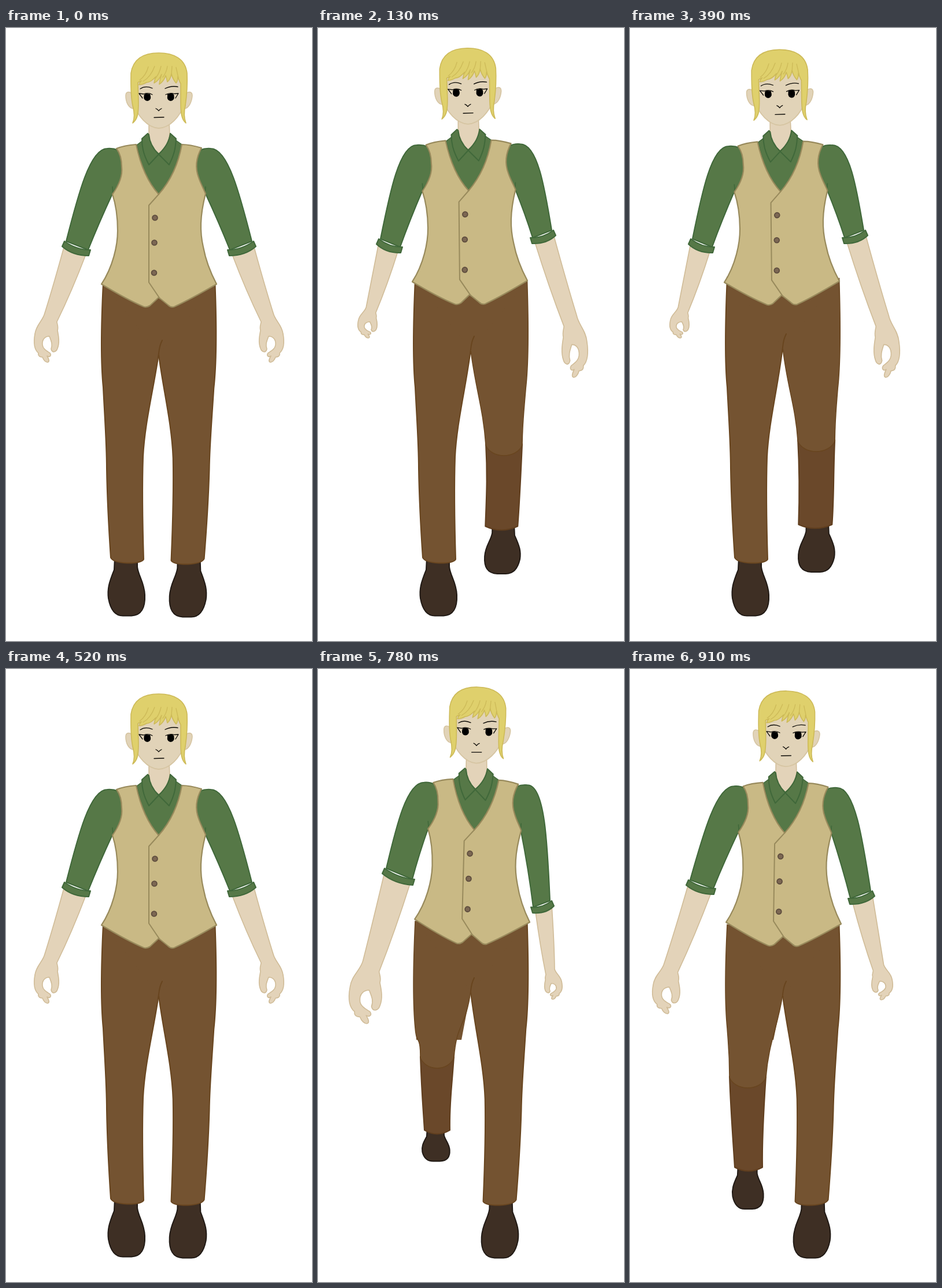
These frames come from a looping animation (529x1058 px, 1040 ms). An HTML page with a canvas:

```html
<!DOCTYPE html>
<html lang="en">
<head>
<meta charset="utf-8">
<title>Walk cycle</title>
<style>
  html, body { margin: 0; width: 100%; height: 100%; overflow: hidden; background: #fff; }
  canvas { display: block; }
</style>
</head>
<body>
<canvas id="stage" width="529" height="1058"></canvas>
<script>
const ctx = document.getElementById('stage').getContext('2d');
const W = 529, H = 1058, STEP = 130;

const SKIN = ['#e3d3b9', '#d0bc98'];
const FACE = ['#e1d3b8', '#d6c5a2'];
const HAIR = ['#dfd06c', '#cdba58'];
const GREEN = ['#567847', '#40683a'];
const VEST = ['#c9b985', '#988a5c'];
const PANTS = ['#745331', '#68451f'];
const SHIN = ['#6a482a', '#603e1e'];
const SHOE = ['#3e2f24', '#211a15'];

const svg = d => new Path2D(d);

function paint(path, [fill, line], width = 2) {
  ctx.fillStyle = fill;
  ctx.fill(path);
  ctx.strokeStyle = line;
  ctx.lineWidth = width;
  ctx.stroke(path);
}

function stroke(path, color, width) {
  ctx.strokeStyle = color;
  ctx.lineWidth = width;
  ctx.stroke(path);
}

// Fixed shapes, drawn in the resting position
const neck = svg('M247 158 L247 184 L250 204 L264 219 L280 203 L283 184 L282 158 Z');
const shirt = svg('M226 202 L238 193 L250 204 L264 217 L280 203 L291 192 L304 201 L295 245 L264 290 L238 250 Z');
const collar = svg(`M245 182 L235 191 C235 205 237 217 247 236 L264 218 C253 207 248 197 247 184 Z
  M284 182 L294 191 C293 208 291 218 282 236 L264 218 C276 206 282 196 284 182 Z`);
const vest = svg(`M191 208 C201 204 212 202 225 201 C232 235 244 265 264 287
  C286 262 298 235 304 201 C316 201 328 204 338 207 C328 225 327 242 333 258
  C337 270 342 278 345 286 C335 325 335 352 341 378 C346 405 355 425 364 442
  C340 456 315 470 291 481 Q285 483 280 478 L264 465 L249 479 Q243 483 238 481
  C212 470 188 456 165 442 C185 412 193 375 193 350 C193 322 190 305 184 287
  C194 273 202 256 200 240 C200 226 197 216 191 208 Z`);
const placket = svg('M264 287 L247 306 L247 439 L266 467');
const buttons = [[257.5, 327.5], [256.5, 370.5], [256, 422.5]];

const ears = svg(`M218 113 C212 109 207 110 207 117 C207 128 212 138 220 139 Z
  M311 113 C317 109 322 110 322 117 C321 128 316 138 309 139 Z`);
const face = svg('M217 85 C217 105 218 120 221 133 C228 151 244 172 264 173 C284 172 300 153 308 133 C311 118 312 100 312 85 C300 50 230 50 217 85 Z');
const hair = svg(`M219 164 C223 155 222 145 219 134 C215 115 216 95 216 78
  C220 52 240 43 264 43 C290 43 310 53 313 78 C314 100 312 120 310 134
  C307 147 308 156 311 164 C303 158 302 145 302 128 L302 96
  Q300 93 297 84 Q297 92 294 95 Q288 88 286 79 Q284 89 279 93
  Q278 87 276 82 Q273 92 265 97 Q266 88 269 80 Q264 91 256 95
  Q257 89 259 84 Q250 94 243 94 Q236 98 230 98 Q231 94 234 91
  L228 94 L229 128 C229 147 228 157 219 164 Z`);
const strands = svg(`M246 67 C243 78 238 85 231 90 M257 66 C253 77 246 87 237 92
  M268 66 C266 75 263 81 259 86 M279 66 C278 73 275 80 271 85 M287 66 L286 80 M294 68 L298 86`);
const irises = svg('M250 118 A6 6.2 0 1 1 238.500 118 Q238 114 242 113 L249 114 Z M279 118 A6 6.200 0 1 0 290.500 118 Q291 114 287 112.500 L279 114 Z');
const features = svg(`M232 105 C238 101 246 101 253 104 M275 104.500 C282 101 290 100 297 101.500
  M230 113 L238 114 Q246 111 253 115 M230 113 L236 121
  M276 115 Q283 111 291 113.500 L298 113 M298 113 L293 121
  M259 139 Q262 140 264 143 Q266 140 269 139 M256 154.500 L273 154`);

const shoe = svg(`M188 914 L187 935 C178 957 175 968 177 984 C181 1006 190 1014 202 1014
  L217 1014 C235 1013 241 1000 240 978 C239 956 229 946 227 930 L227 914 Z`);

// Cubic segments after the first point, from outer wrist to inner wrist
const hand = [
  67, 492, 64, 505, 52, 512, 50, 528, 47, 545, 50, 556, 56, 561,
  55, 567, 60, 568, 63, 568, 65, 574, 69, 577, 72, 577,
  76, 576, 74, 571, 71, 566, 76, 569, 79, 565, 76, 561,
  70, 557, 64, 554, 63, 547, 62, 537, 68, 532, 75, 532,
  78, 540, 81, 546, 78, 554, 80, 562, 87, 559, 89, 553,
  93, 543, 91, 532, 89, 522, 91, 515, 88, 510, 88, 507
];

// Arms: outer cuff x y, inner cuff x y, then the hand's left, right, top, bottom
const ARM = {
  rest: [97, 377, 143, 393, 49, 92, 492, 577],
  back: [101, 373, 143, 388, 69, 103, 482, 535],
  back2: [106, 392, 149, 406, 75, 112, 510, 571],
  farBack: [121, 409, 158, 421, 107, 138, 518, 570],
  front: [118, 358, 159, 372, 63, 108, 496, 603],
  front2: [97, 373, 145, 389, 39, 87, 508, 595],
  farFront: [111, 353, 164, 373, 54, 111, 503, 612]
};

// body: shift x, shift y, lean in degrees, stretch
// leg: knee left, right, y; hem left, right, y; shoe left, right, y
const rest = { body: [0, 0, 0, 1], crotch: 562, arms: [ARM.rest, ARM.rest] };
const poses = [
  rest,
  { body: [-2, -5, -0.57, 1.008], crotch: 555, arms: [ARM.back, ARM.front],
    lifted: 1, leg: [173, 236, 736, 179, 235, 861, 174, 236, 940] },
  { body: [-2, -7.5, -1.5, 1.011], crotch: 555, arms: [ARM.farBack, ARM.farFront],
    lifted: 1, leg: [174, 236, 687, 181, 226, 798, 177, 225, 847] },
  { body: [-2, -4, -0.6, 1.004], crotch: 551, arms: [ARM.back, ARM.front],
    lifted: 1, leg: [172, 236, 729, 175, 233, 858, 170, 233, 937] },
  rest,
  { body: [1, -3.5, 0.63, 1.005], crotch: 560, arms: [ARM.front2, ARM.back2],
    lifted: 0, leg: [173, 234, 726, 181, 231, 871, 178, 231, 941] },
  { body: [2, -7.5, 1.5, 1.011], crotch: 556, arms: [ARM.farFront, ARM.farBack],
    lifted: 0, leg: [177, 235, 689, 184, 228, 799, 180, 228, 849.5] },
  { body: [1, -3.5, 0.86, 1.004], crotch: 562, arms: [ARM.front2, ARM.back2],
    lifted: 0, leg: [172, 235, 723, 181, 229, 863, 177, 231, 932] }
];

function bodyMatrix([x, y, lean, stretch]) {
  return new DOMMatrix().translate(264 + x, 445 + y).rotate(lean)
    .scale(1, stretch).translate(-264, -445);
}

function drawShoe(left, right, top, bottom) {
  const fit = new DOMMatrix().translate(left, bottom)
    .scale((right - left) / 64, (bottom - top) / 94).translate(-176.5, -1014);
  const path = new Path2D();
  path.addPath(shoe, fit);
  paint(path, SHOE);
}

function drawLeg(side, pose) {
  const { crotch, leg, lifted } = pose;
  const top = `M168 ${crotch - 121} C164 520 164 580 168 620`;
  ctx.save();
  if (side) ctx.transform(-1, 0, -0.0125, 1, 535, 2);
  if (leg && lifted === side) {
    const [kl, kr, ky, hl, hr, hy, sl, sr, sy] = leg;
    drawShoe(sl, sr, hy, sy);
    paint(svg(`M${kl} ${ky - 20} C${kl + 2} ${ky + 40} ${hl - 3} ${hy - 50} ${hl} ${hy - 3}
      Q${(hl + hr) / 2} ${hy + 10} ${hr} ${hy - 3} C${hr - 1} ${hy - 50} ${kr - 4} ${ky + 40} ${kr} ${ky - 20} Z`), SHIN);
    paint(svg(`${top} C170 650 ${kl} ${ky - 60} ${kl} ${ky - 18}
      C${kl + 10} ${ky + 6} ${kr - 10} ${ky + 6} ${kr} ${ky - 18}
      C${kr + 5} ${ky - 80} 255 620 264 ${crotch}`), PANTS, 1.5);
  } else {
    drawShoe(176.5, 240.5, 920, 1014.5);
    paint(svg(`${top} C171 680 174 720 174 760 C175 820 178 870 181 914
      Q184 922 209 923.500 Q234 924 238 917 C236 850 235 800 237 740
      C240 680 256 620 264 ${crotch}`), PANTS);
  }
  ctx.restore();
}

function drawLegs(pose) {
  const c = pose.crotch;
  ctx.fillStyle = PANTS[0];
  ctx.fill(svg(`M168 ${c - 121} L360 ${c - 121} L363 560 L350 640 L282 640 L264 ${c} L248 640 L170 640 L165 560 Z`));
  drawLeg(0, pose);
  drawLeg(1, pose);
  stroke(svg(`M270 ${c - 23} Q265 ${c - 13} 264 ${c}`), PANTS[1], 2);
}

function drawArm(side, arm, body) {
  const [ox, oy, ix, iy, left, right, top, bottom] = arm;
  const at = (x, y) => {
    const p = body.transformPoint(new DOMPoint(side ? W - x : x, y));
    return [side ? W - p.x : p.x, p.y];
  };
  const hx = x => left + (x - 49) / 43 * (right - left);
  const hy = y => top + (y - 492) / 85 * (bottom - top);

  ctx.save();
  if (side) ctx.transform(-1, 0, 0, 1, W, 0);

  const limb = new Path2D();
  const wx = hx(67), ex = hx(88), ey = hy(507);
  limb.moveTo(ox + 4, oy - 2);
  limb.quadraticCurveTo((ox + 4 + wx) / 2 - 2, (oy + top) / 2 + 10, wx, top);
  for (let i = 2; i < hand.length; i += 6) {
    const [a, b, c, d, e, f] = hand.slice(i, i + 6);
    limb.bezierCurveTo(hx(a), hy(b), hx(c), hy(d), hx(e), hy(f));
  }
  limb.quadraticCurveTo((ix - 5 + ex) / 2 + 1, (iy + ey) / 2 + 4, ex + (ix - 5 - ex), iy - 2);
  limb.closePath();
  paint(limb, SKIN, 1.6);

  const [sx, sy] = at(175, 208), [nx, ny] = at(194, 211);
  const [px, py] = at(185, 284), [qx, qy] = at(212, 245);
  const tx = ox + 7, ty = oy - 9, ux = ix - 1, uy = iy - 10;
  const sleeve = new Path2D();
  sleeve.moveTo(nx, ny);
  sleeve.quadraticCurveTo(sx + 10, sy - 1, sx, sy);
  sleeve.bezierCurveTo(sx - 30, sy, (sx + tx) / 2 - 15, (sy + ty) / 2, tx, ty);
  sleeve.lineTo(ux, uy);
  sleeve.quadraticCurveTo((ux + px) / 2 - 3, (uy + py) / 2 + 3, px, py);
  sleeve.lineTo(qx, qy);
  sleeve.closePath();
  paint(sleeve, GREEN);
  stroke(svg(`M${px} ${py + 2} L${px - 1} ${py - 10}`), GREEN[1], 1.6);

  const mx = (ox + ix) / 2, my = (oy + iy) / 2;
  paint(svg(`M${ox + 4} ${oy - 9} Q${mx + 2} ${my - 2} ${ix + 3} ${iy - 10}
    L${ix} ${iy} Q${mx - 5} ${my + 8} ${ox} ${oy} Z`), GREEN);
  ctx.restore();
}

function drawTorso() {
  paint(neck, SKIN, 1.5);
  paint(shirt, GREEN, 1.5);
  paint(collar, GREEN);
  paint(vest, VEST, 2.2);
  stroke(placket, VEST[1], 2);
  for (const [x, y] of buttons) {
    const dot = new Path2D();
    dot.arc(x, y, 4.4, 0, 7);
    paint(dot, ['#7c6753', '#5d4c3d'], 1.8);
  }
}

function drawHead() {
  paint(ears, FACE, 1.6);
  paint(face, FACE, 1.8);
  paint(hair, HAIR, 1.6);
  stroke(strands, HAIR[1], 1.3);
  ctx.fillStyle = '#000';
  ctx.fill(irises);
  stroke(features, '#0b0905', 1.3);
}

function draw(now) {
  const pose = poses[Math.floor(now / STEP) % poses.length];
  const body = bodyMatrix(pose.body);
  ctx.setTransform(1, 0, 0, 1, 0, 0);
  ctx.fillStyle = '#fff';
  ctx.fillRect(0, 0, W, H);
  ctx.lineJoin = ctx.lineCap = 'round';
  drawLegs(pose);
  pose.arms.forEach((arm, side) => drawArm(side, arm, body));
  ctx.setTransform(body);
  drawTorso();
  drawHead();
}

const start = performance.now();
function loop() {
  draw(performance.now() - start);
  requestAnimationFrame(loop);
}
loop();
</script>
</body>
</html>
```
